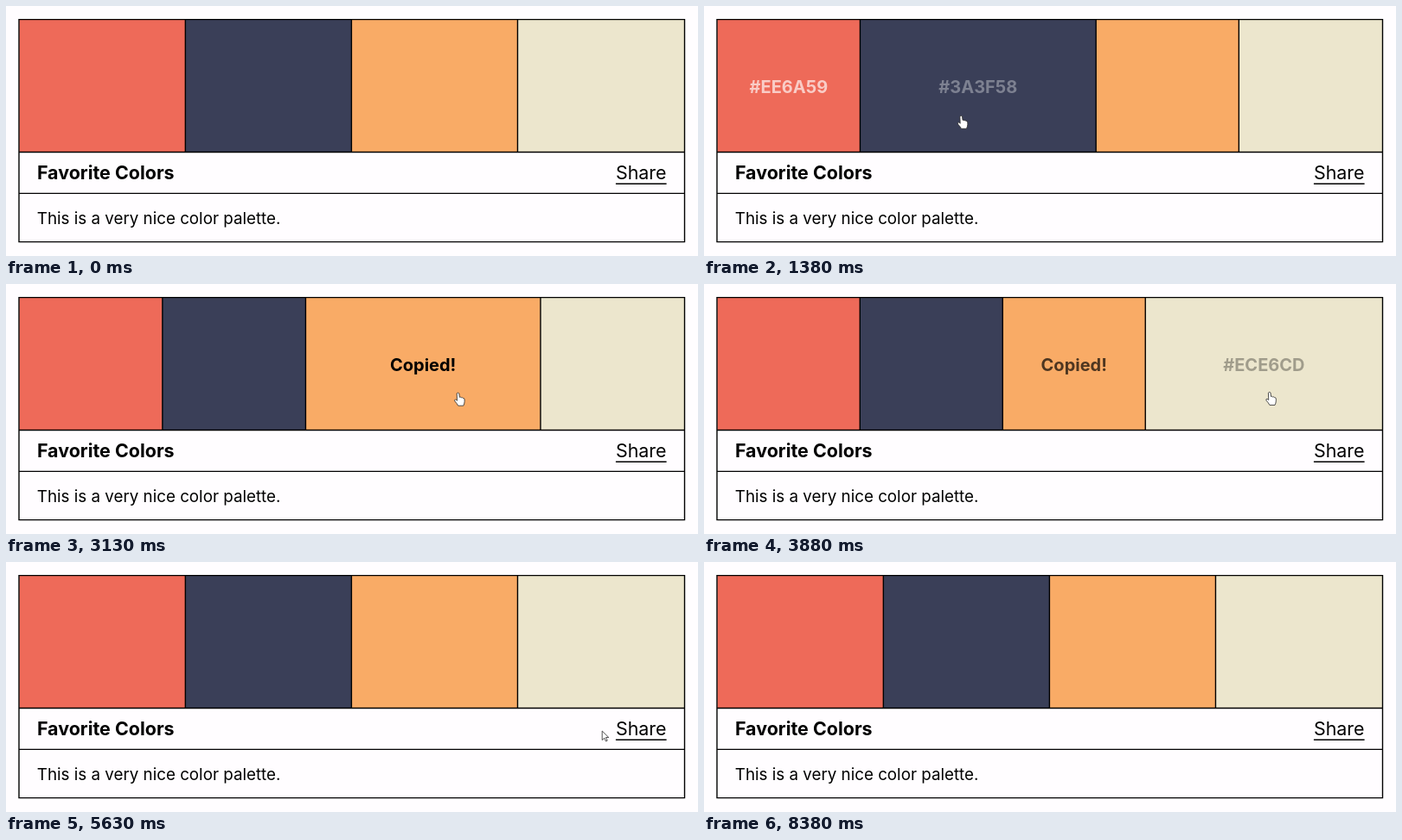
Write an HTML page that moves like this. It is 800x290 px and loops after 9130 ms.

```html
<!DOCTYPE html>
<html lang="en">
<head>
<meta charset="utf-8">
<title>Color palette</title>
<style>
  html, body { margin: 0; width: 100%; height: 100%; overflow: hidden; background: #fffdff; }
  svg { display: block; width: 800px; height: 290px; }
  text { font-family: Inter, "Liberation Sans", sans-serif; font-optical-sizing: none; fill: #000; }
  .title { font-size: 21.45px; font-weight: 700; }
  .share { font-size: 21.45px; text-anchor: end; }
  .note { font-size: 18.78px; }
  .label { font-size: 20px; font-weight: 700; text-anchor: middle; }
  .line { fill: none; stroke: #000; stroke-width: 1.4; }
  #cursor path { fill: #fff; stroke: #333; stroke-width: .85; stroke-linejoin: round; }
</style>
</head>
<body>
<svg viewBox="0 0 800 290">
  <g id="panels"></g>
  <path class="line" d="M15 15.6H784.5V273.6H15ZM15 169.5H784.5M15 217.4H784.5"/>
  <text class="title" x="35.9" y="201.3">Favorite Colors</text>
  <text class="share" id="share" x="763.6" y="201.3">Share</text>
  <path class="line" id="underline"/>
  <text class="note" x="35.8" y="252.5">This is a very nice color palette.</text>
  <g id="cursor">
    <path id="arrow" d="M0 0V10.5L2.6 8.2 4.3 12 6 11.2 4.3 7.5H7.6Z"/>
    <path id="hand" d="M-1.3 .9Q0 -.6 1.3 .9L1.8 5.3Q2.9 4.7 3.8 5.8Q5 5.2 5.9 6.4Q7.4 6.2 7.6 8V10.5Q7.4 13 6.3 15.2H.2Q-1.2 12.5 -3.6 10Q-4.6 8.2 -2.8 8Q-1.9 8.2 -1 9.3Z"/>
  </g>
</svg>
<script>
const LOOP = 9130, TICK = 125;
const LEFT = 15.3, WIDTH = 768.2, TOP = 15.6, BOTTOM = 169.5;
const GROW = 0.64, FADE = 190;
const COPY_AT = 3125, SHARE_ON = 6375, SHARE_OFF = 8375, LEAVE = 7000;

const colors = [["#EE6A59", "#fff"], ["#3A3F58", "#fff"], ["#F9AB66", "#000"], ["#ECE6CD", "#000"]];

// Time at which each panel gains the pointer; -1 means none.
const hovers = [[-999, -1], [175, 0], [1310, 1], [2310, 2], [3815, 3], [5060, -1]]
  .map(([at, panel]) => ({ at, panel }));

// Each pointer move eases from the end of the one before.
const start = { x: 62, y: 290 };
const moves = [
  { from: 0, to: 350, x: 87, y: 128 },
  { from: 1000, to: 1450, x: 314, y: 127 },
  { from: 1950, to: 2530, x: 522.5, y: 126 },
  { from: 3575, to: 4015, x: 695, y: 125 },
  { from: 4980, to: 5230, x: 689.2, y: 196 },
  { from: 5630, to: 6000, x: 754, y: 196 },
  { from: 6700, to: LEAVE, x: 766, y: 198 }
];

const $ = id => document.getElementById(id);
const clamp = v => Math.max(0, Math.min(1, v));
const ease = p => p * p * (3 - 2 * p);
const spring = t => 1 - Math.exp(-t / 16.3) * Math.cos(2 * Math.PI * t / 120);

function set(el, attrs) {
  for (const k in attrs) el.setAttribute(k, attrs[k]);
  return el;
}

function add(tag, attrs) {
  const el = document.createElementNS("http://www.w3.org/2000/svg", tag);
  return $("panels").appendChild(set(el, attrs));
}

const panels = colors.map(([color, ink]) => ({
  color,
  rect: add("rect", { y: TOP, height: BOTTOM - TOP, fill: color }),
  label: add("text", { class: "label", y: 100.6, style: `fill:${ink}` })
}));
const dividers = panels.slice(1).map(() => add("path", { class: "line" }));

function drawPanels(t) {
  const k = hovers.filter(h => h.at <= t).length - 1;
  const now = hovers[k], before = hovers[Math.max(0, k - 1)];
  const p = spring(t - now.at);
  const fade = clamp((t - now.at) / FADE);
  const mix = (i, on, off) => i === now.panel ? on : i === before.panel ? off : 0;
  const grow = panels.map((_, i) => 1 + GROW * Math.max(0, mix(i, p, 1 - p)));
  const unit = WIDTH / grow.reduce((a, b) => a + b);
  let x = LEFT;
  panels.forEach(({ color, rect, label }, i) => {
    const end = i < dividers.length ? x + grow[i] * unit : 784.5;
    set(rect, { x, width: end - x });
    set(label, { x: (x + end) / 2, opacity: mix(i, fade, 1 - fade) });
    label.textContent = i === 2 && t >= COPY_AT ? "Copied!" : color;
    if (dividers[i]) set(dividers[i], { d: `M${end} ${TOP}V${BOTTOM}` });
    x = end;
  });
}

function drawShare(t) {
  const share = $("share");
  share.textContent = t >= SHARE_ON && t < SHARE_OFF ? "Link Copied!" : "Share";
  set($("underline"), { d: `M763.6 206.3h${-share.getComputedTextLength()}` });
}

function drawCursor(t) {
  let { x, y } = start;
  for (const m of moves) {
    const p = ease(clamp((t - m.from) / (m.to - m.from)));
    x += (m.x - x) * p;
    y += (m.y - y) * p;
  }
  const onShare = x > 704 && x < 760 && y > 184;
  const hand = y < BOTTOM || onShare;
  set($("cursor"), { transform: `translate(${x} ${y})` });
  $("cursor").style.display = t < LEAVE ? "" : "none";
  $("hand").style.display = hand ? "" : "none";
  $("arrow").style.display = hand ? "none" : "";
}

// The picture advances eight times a second, on times rounded to 10 ms.
function tickAt(ms) {
  const k = Math.floor(ms / TICK);
  return Math.round(k * TICK / 10) * 10 > ms ? k - 1 : k;
}

function frame() {
  const t = tickAt(performance.now() % LOOP) * TICK;
  drawPanels(t);
  drawShare(t);
  drawCursor(t);
  requestAnimationFrame(frame);
}
frame();
</script>
</body>
</html>
```
